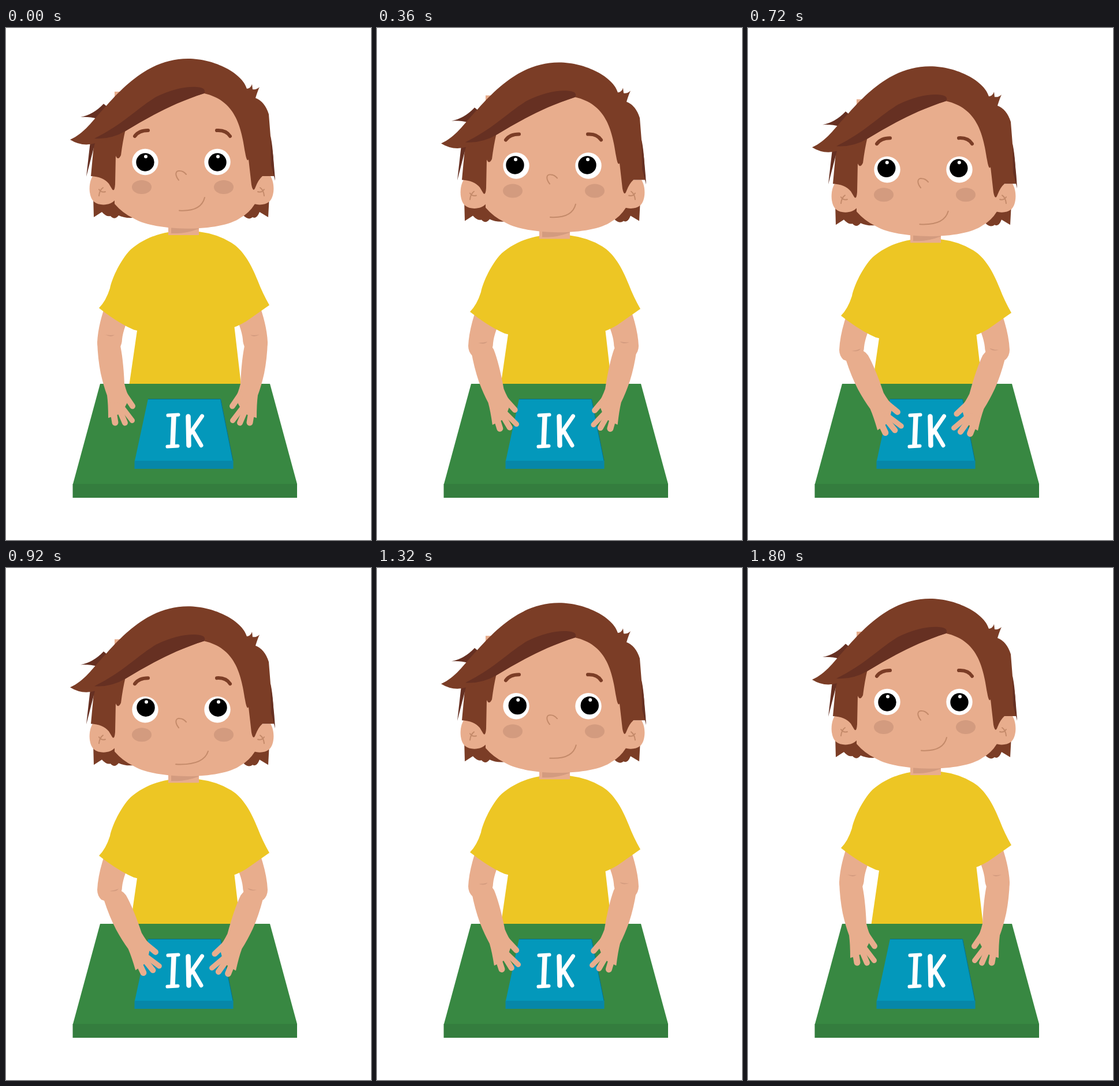
Write an HTML page that moves like this. It is 632x885 px and loops after 1840 ms.

```html
<!DOCTYPE html>
<html lang="nl">
<head>
<meta charset="utf-8">
<title>Ik</title>
<style>
  html, body { margin: 0; width: 100%; height: 100%; overflow: hidden; background: #fff; }
  svg { display: block; width: 100%; height: 100%; }
  .skin { fill: #e8ad8d; }
  .hair { fill: #7b3d26; }
  .dark { fill: #663022; }
  .blush { fill: #d39b7f; }
  .line { fill: none; stroke: #c48a6a; stroke-width: 2; stroke-linecap: round; }
  .brow { fill: none; stroke: #7b3d26; stroke-width: 6; stroke-linecap: round; }
  .finger { fill: none; stroke: #e8ad8d; stroke-linecap: round; }
</style>
</head>
<body>
<svg viewBox="0 0 632 885">
  <defs>
    <path id="upper" class="skin" d="M172 478L168 491Q159 520 158 543Q158 553 165 560Q182 568 196 555Q201 546 201 538Q202 528 207 514V485Z"/>
    <g id="forearm">
      <path class="skin" d="M158 543Q159 572 164 597Q169 619 175 635Q177 650 177 674L190 670L203 664L206 655L214 640Q209 631 205 615Q203 570 197 545Q190 528 175 528Q162 530 158 543Z"/>
      <path class="finger" stroke-width="11" d="M184 652L189 682"/>
      <path class="finger" stroke-width="10" d="M193 652L206 682.500"/>
      <path class="finger" stroke-width="9" d="M199 653L218.500 678.500"/>
      <path class="finger" stroke-width="10" d="M205 633L219 653.500"/>
      <path class="blush" d="M172 530Q180 531.500 188 530.500Q182 535.500 172 530Z"/>
    </g>
    <g id="ear">
      <path class="skin" d="M150 256C143 267 142 290 152 300C163 309 182 306 189 297V256Z"/>
      <path class="line" stroke-width="1.800" d="M161 290Q162 280 168 276M161 279Q165 285 172 283"/>
    </g>
    <g id="eye">
      <circle r="22.700" fill="#fff"/>
      <g class="pupil">
        <circle r="15.700"/>
        <circle cx="1" cy="-9.700" r="3" fill="#fff"/>
      </g>
    </g>
  </defs>

  <g class="body">
    <use href="#upper"/>
    <use href="#upper" transform="matrix(-1 0 0 1 611 0)"/>
    <path fill="#edc624" d="M281 353C255 357 227 371 212 387C195 407 183 435 180 450Q173 472 161 484Q194 510 221 521.500L227 523L213.500 616L211 640H410L407 616L395.500 517Q402 515 416 507L456 479Q444 458 436 437C424 407 410 383 390 371Q366 356 334 352Z"/>
    <path class="skin" d="M281 335H334V358H281Z"/>
    <path class="blush" d="M286 340H334V347Q312 355 296 355H286Z"/>
    <path class="hair" d="M151 290L152 327L166 318Q174 327 181 325Q188 333 195 324Q205 329 220 328L240 290ZM456 290L454 327L439 318Q434 331 427 327Q420 333 411 324Q403 329 391 329L370 290Z"/>
    <use href="#ear"/>
    <use href="#ear" transform="matrix(-1 0 0 1 608 0)"/>
    <path class="skin" d="M188 110V304Q202 320 219 328C258 353 372 353 406 328Q421 320 431 304V110Z"/>
    <path class="hair" d="M155 170L147 256Q168 257 178 269L184 279Q188 284 189 270L190 221Q194 230 199 220Q202 196 207 175Z"/>
    <path class="dark" d="M146 196L139 257L154 199ZM129 154Q151 150 169 131L180 140L158 157Q145 153 129 154Z"/>
    <path class="hair" d="M111 193C136 182 148 162 175 133C212 92 255 53 315 53C362 53 410 79 417 105Q424 104 426 97L427 106Q434 107 439 102Q436 108 432 121Q448 127 455 149L458 187Q463 207 464 256H444Q437 262 432 275Q428 286 425 271L420 227Q417 233 414 215C407 168 396 125 343 113C290 130 250 152 207 178Q180 196 155 199Q132 206 111 193Z"/>
    <path class="dark" d="M153 191C205 165 225 140 260 119C293 102 330 98 342 105Q346 109 343 113C290 130 250 152 207 178Q182 193 153 191ZM458 187Q464 225 466 264L459 237Z"/>
    <path class="brow" d="M223 187Q230 177 246 177M365 177Q381 176 388 187"/>
    <ellipse class="blush" cx="235" cy="275" rx="17" ry="12"/>
    <ellipse class="blush" cx="377" cy="275" rx="17" ry="12"/>
    <path class="line" d="M299 263C292 254 293 246 301 247Q307 247 312 253"/>
    <path class="line mouth"/>
    <use href="#eye" x="241" y="231.500"/>
    <use href="#eye" x="366" y="231.500"/>
  </g>

  <path fill="#388842" d="M163 615H457L504 788H116Z"/>
  <path fill="#347d3e" d="M115.500 788H504V812H115.500Z"/>
  <path fill="#0398bb" d="M246 641H372L393 748H223Z"/>
  <path fill="#0787a8" d="M222.500 748H393.500V762H222.500Z"/>
  <path fill="none" stroke="#0a6f86" d="M246 641.500H371.500L393 748"/>
  <g role="img" aria-label="IK" fill="none" stroke="#fff" stroke-linecap="round" stroke-linejoin="round">
    <path stroke-width="6" d="M280.500 669.500L298.500 668.500M279.500 723.500L297.500 722.500"/>
    <path stroke-width="8.500" d="M290.500 671L288.500 721M315.500 671.500L316.500 721.500"/>
    <path stroke-width="7" d="M339.500 671L318 702M323 696L338 721.500"/>
  </g>

  <g class="arm"><use href="#forearm"/></g>
  <g transform="matrix(-1 0 0 1 611 0)"><g class="arm"><use href="#forearm"/></g></g>
</svg>
<script>
const LOOP = 1840, STEP = 40, DROP = 13.2;
const body = document.querySelector('.body');
const mouth = document.querySelector('.mouth');
const pupil = document.querySelector('.pupil');
const arms = [...document.querySelectorAll('.arm')];
const swings = [{ angle: 16, pivot: '229 510' }, { angle: 12.5, pivot: '235 514' }];

// Pairs of time and value, joined by straight lines
const gazeX = [[0, 0], [360, -2], [560, -3], [920, 1], [1040, 1], [1480, 3], [1800, 0], [LOOP, 0]];
const gazeY = [[0, 0], [360, -1.5], [560, -2], [920, -4], [1040, -4], [1200, -2.5], [1480, -.5], [1800, 0], [LOOP, 0]];
const smile = [[0, 0], [560, 0], [920, 1], [1040, 1], [1360, 0], [LOOP, 0]];

function at(keys, t) {
  const i = Math.max(1, keys.findIndex(k => k[0] >= t));
  const [t0, a] = keys[i - 1], [t1, b] = keys[i];
  return a + (b - a) * (t - t0) / (t1 - t0);
}

function ease(t, start, length) {
  const u = Math.min(1, Math.max(0, (t - start) / length));
  return u * u * (3 - 2 * u);
}

function draw(t) {
  const lean = ease(t, 0, 730) - ease(t, 1030, 625);
  const dy = DROP * lean;
  body.setAttribute('transform', `translate(0 ${dy})`);
  arms.forEach((arm, i) => {
    const { angle, pivot } = swings[i];
    arm.setAttribute('transform', `translate(0 ${dy}) rotate(${-angle * lean} ${pivot})`);
  });
  pupil.setAttribute('transform', `translate(${at(gazeX, t)} ${at(gazeY, t) + .5})`);

  const wide = 1 + .27 * at(smile, t), low = 10.5 * lean;
  const pt = (x, y) => `${322 + (x - 322) * wide} ${y + low}`;
  mouth.setAttribute('d', `M${pt(300, 315.5)}C${pt(325, 317)} ${pt(340, 309)} ${pt(344, 293)}`);
}

function frame() {
  const t = performance.now() % LOOP;
  draw(Math.floor(t / STEP) * STEP);
  requestAnimationFrame(frame);
}
frame();
</script>
</body>
</html>
```
